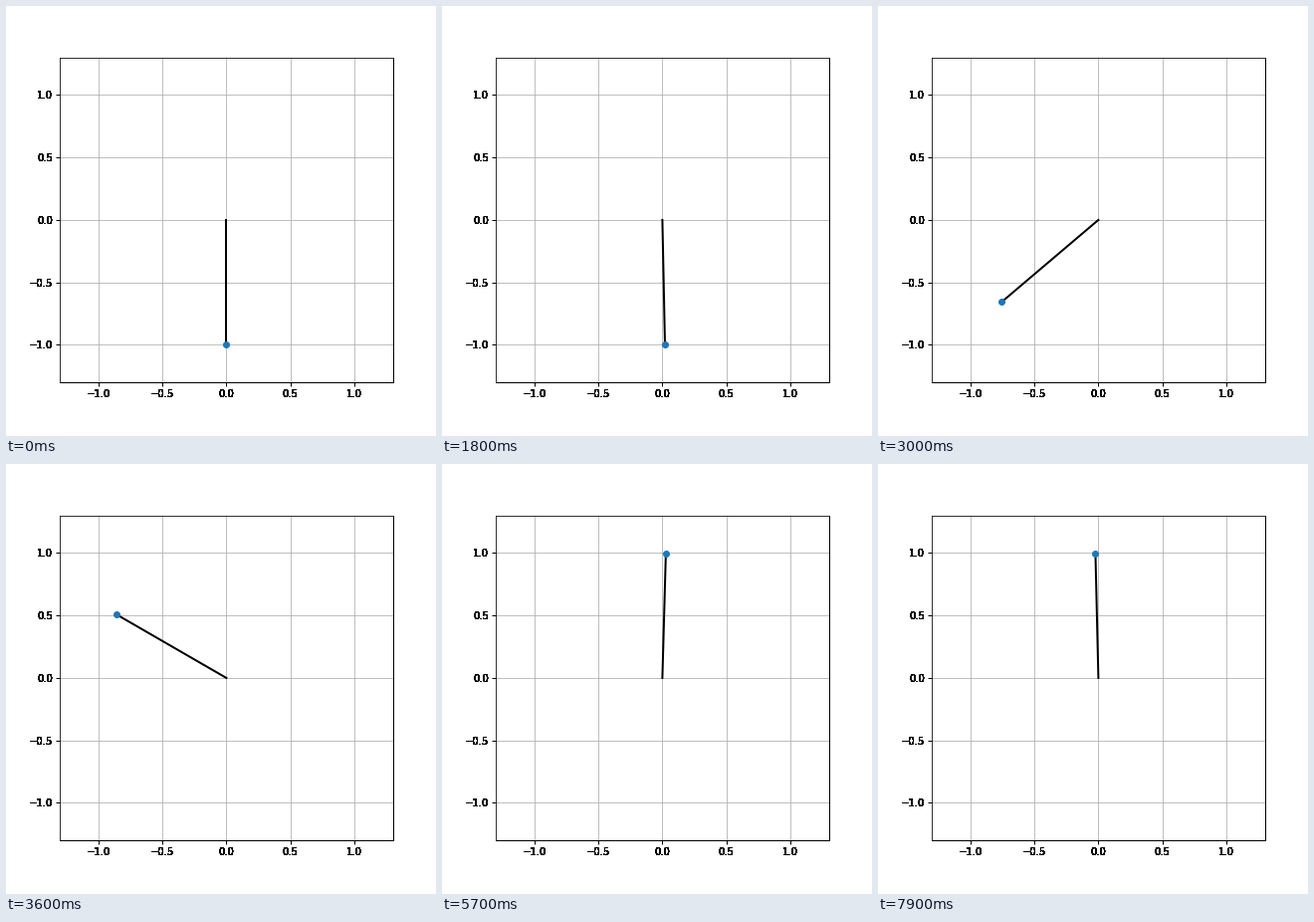
A matplotlib script for the animation above (8000 ms loop, 432x432 px).

```python
import numpy as np
import matplotlib.pyplot as plt
from matplotlib.animation import FuncAnimation

FRAMES, STEP = 80, 100
LIM = 1.3
RATE = 3.3                 # growth and decay rate near the balance, 1/s
BOTTOM = 4.188             # last pass through the lowest point, s

# Turning points of the growing swing: time (s), angle from straight down.
# The last one mirrors its predecessor; the rise takes over halfway to it.
TURNS = [(0, 0), (0.57, 0.2), (1.5, -0.45), (2.29, 1.04), (3.55, -2.122),
         (2 * BOTTOM - 3.55, 2.122)]


def swing(t):
    """Cosine easing from one turning point to the next."""
    for (t0, a0), (t1, a1) in zip(TURNS, TURNS[1:]):
        if t < t1:
            ease = (1 - np.cos(np.pi * (t - t0) / (t1 - t0))) / 2
            return a0 + (a1 - a0) * ease


def angle(t):
    if t < BOTTOM:
        return swing(t)
    # Rise towards the upright balance, then slowly tip over it
    rise = np.pi - 4 * np.arctan(np.exp(-RATE * (t - BOTTOM)))
    return rise + 0.023 * np.exp(RATE * (t - 7.9))


plt.rcParams["font.family"] = "DejaVu Sans"
fig, ax = plt.subplots(figsize=(6, 6), dpi=72, facecolor="white")
fig.subplots_adjust(left=0.125, right=0.9, bottom=0.125, top=0.88)

ticks = np.arange(-1, 1.1, 0.5)
ax.set(xlim=(-LIM, LIM), ylim=(-LIM, LIM), xticks=ticks, yticks=ticks)
ax.tick_params(labelbottom=False, labelleft=False, length=4, width=1)
ax.grid(color="#b0b0b0", linewidth=0.8)
ax.spines[["right", "bottom"]].set_linewidth(1)


def tick_labels(place, at):
    # Stacked copies harden the glyph edges into a heavy black
    trans, va, ha = place(7)
    for v in ticks:
        label = f"{v:.1f}".replace("-", "\u2212")
        for _ in range(24):
            ax.text(*at(v), label, transform=trans, va=va, ha=ha, fontsize=10)


tick_labels(ax.get_xaxis_text1_transform, lambda v: (v, 0))
tick_labels(ax.get_yaxis_text1_transform, lambda v: (0, v))

rod, = ax.plot([], [], color="black", linewidth=2)
bob, = ax.plot([], [], "o", color="#1f77b4", markersize=6)


def update(frame):
    a = angle(frame * STEP / 1000)
    x, y = np.sin(a), -np.cos(a)
    rod.set_data([0, x], [0, y])
    bob.set_data([x], [y])
    return rod, bob


anim = FuncAnimation(fig, update, frames=FRAMES, interval=STEP,
                     repeat=True, repeat_delay=0, blit=False)
plt.show()
```
